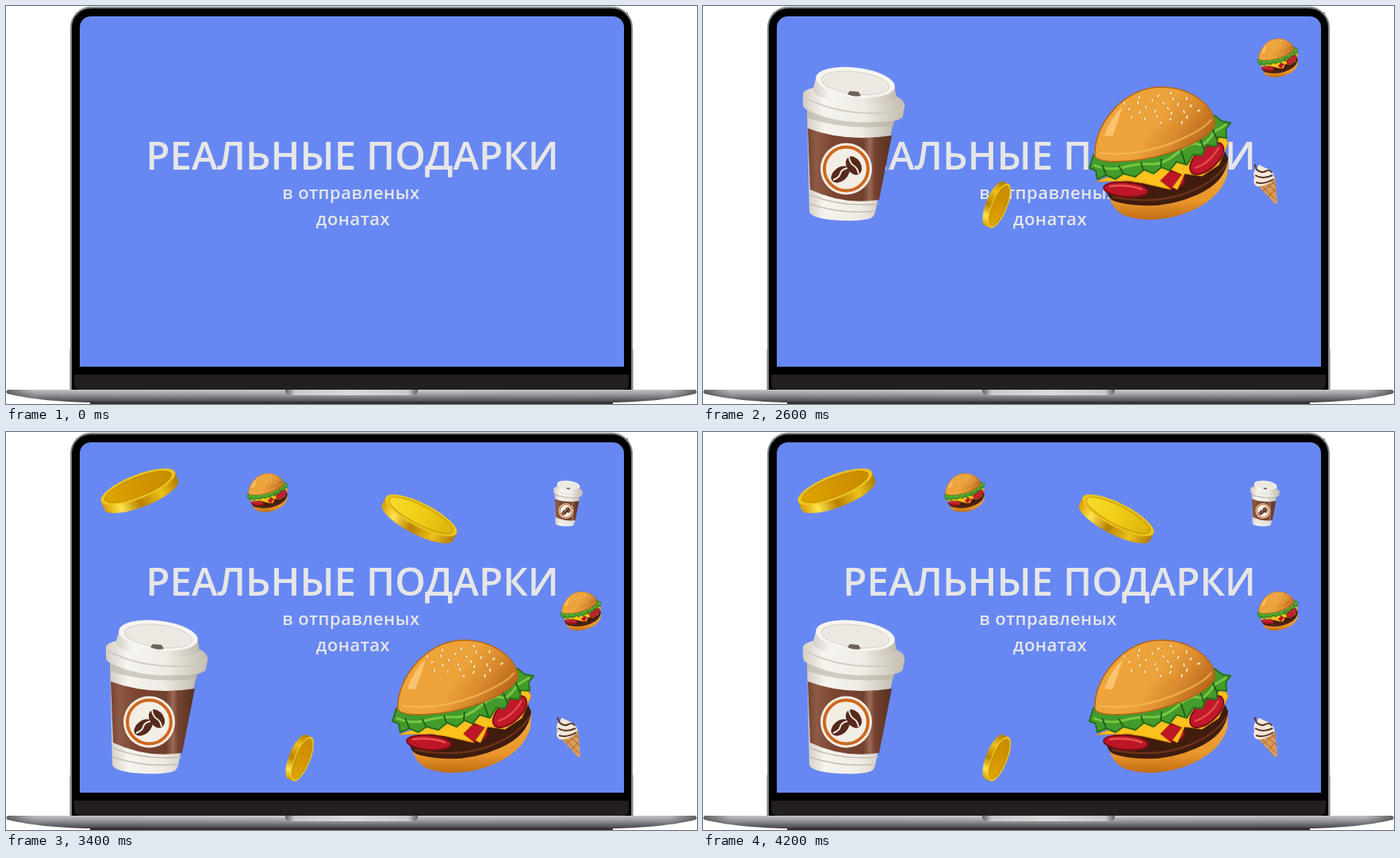
Animation of 871 by 501 pixels, one loop 6.2 s. Source, as an HTML page:

```html
<!DOCTYPE html>
<html lang="ru">
<head>
<meta charset="utf-8">
<style>
  html, body { margin: 0; width: 100%; height: 100%; overflow: hidden; background: #fff; }
  svg { display: block; width: 100%; height: 100%; }
  text { font-family: "Open Sans", "Noto Sans", sans-serif; font-weight: 600; text-anchor: middle; fill: #e6e6e6; }
  .title { font-size: 49.2px; }
  .sub { font-size: 22px; letter-spacing: .45px; }
</style>
</head>
<body>
<svg viewBox="0 0 871 501">
  <defs>
    <linearGradient id="paper">
      <stop offset="0" stop-color="#d3cdc3"/><stop offset=".2" stop-color="#f6f4ef"/>
      <stop offset=".6" stop-color="#efece5"/><stop offset="1" stop-color="#c2bbaf"/>
    </linearGradient>
    <linearGradient id="sleeve">
      <stop offset="0" stop-color="#744333"/><stop offset=".1" stop-color="#8d5a45"/>
      <stop offset=".3" stop-color="#7c4531"/><stop offset=".66" stop-color="#70402f"/>
      <stop offset=".74" stop-color="#9b6a55"/><stop offset=".8" stop-color="#764232"/>
      <stop offset="1" stop-color="#55301f"/>
    </linearGradient>
    <linearGradient id="bun" x1=".1" y1=".25" x2=".95" y2=".6">
      <stop offset="0" stop-color="#f0a53a"/><stop offset=".5" stop-color="#eda23a"/>
      <stop offset=".75" stop-color="#d98a2e"/><stop offset="1" stop-color="#b9681d"/>
    </linearGradient>
    <linearGradient id="heel" x2="0" y2="1">
      <stop offset="0" stop-color="#f6ad3c"/><stop offset=".7" stop-color="#e8952b"/>
      <stop offset="1" stop-color="#c06d14"/>
    </linearGradient>
    <linearGradient id="rim">
      <stop offset="0" stop-color="#d99a00"/><stop offset=".2" stop-color="#ffe44d"/>
      <stop offset=".45" stop-color="#b88000"/><stop offset=".75" stop-color="#edc21a"/>
      <stop offset="1" stop-color="#b07a00"/>
    </linearGradient>
    <linearGradient id="gold">
      <stop offset="0" stop-color="#dfa600"/><stop offset=".5" stop-color="#d39500"/><stop offset="1" stop-color="#c88b00"/>
    </linearGradient>
    <linearGradient id="brightGold">
      <stop offset="0" stop-color="#f7dc2a"/><stop offset=".5" stop-color="#efcd16"/><stop offset="1" stop-color="#dcb30c"/>
    </linearGradient>
    <linearGradient id="base" x2="0" y2="1">
      <stop offset="0" stop-color="#cfcfd3"/><stop offset=".3" stop-color="#aaa9af"/>
      <stop offset=".65" stop-color="#77767c"/><stop offset="1" stop-color="#3f3f43"/>
    </linearGradient>
    <linearGradient id="baseEnds">
      <stop offset="0" stop-color="#333" stop-opacity=".7"/><stop offset=".04" stop-color="#444" stop-opacity=".1"/>
      <stop offset=".5" stop-color="#444" stop-opacity="0"/>
      <stop offset=".96" stop-color="#444" stop-opacity=".1"/><stop offset="1" stop-color="#333" stop-opacity=".7"/>
    </linearGradient>
    <linearGradient id="notch">
      <stop offset="0" stop-color="#5e5e62"/><stop offset=".07" stop-color="#c9c9cc"/>
      <stop offset=".5" stop-color="#dadadd"/><stop offset=".93" stop-color="#c9c9cc"/><stop offset="1" stop-color="#5e5e62"/>
    </linearGradient>

    <g id="cup">
      <path d="M131 288L134 419Q136 426 160 429Q190 432 209 428Q216 426 217 419L242 296Z" fill="url(#paper)"/>
      <path d="M132 314Q180 332 238 323L222 404Q177 411 135 391Z" fill="url(#sleeve)"/>
      <path d="M135 398Q177 414 221 409M134 409Q176 423 218 418" fill="none" stroke="#c5beb2" stroke-width="1.5"/>
      <circle cx="180.500" cy="365" r="32.5" fill="#f3eee5"/>
      <circle cx="180.500" cy="365" r="27.5" fill="none" stroke="#cd681e" stroke-width="4"/>
      <g fill="#55291b">
        <ellipse cx="173" cy="372" rx="13" ry="8.5" transform="rotate(-38 173 372)"/>
        <ellipse cx="190" cy="361" rx="12.5" ry="9" transform="rotate(58 190 361)"/>
      </g>
      <path d="M164 379Q172 376 173 371T182 364M184 350Q185 358 190 361T196 371" fill="none" stroke="#f3eee5" stroke-width="2"/>
      <path d="M131 291Q180 314 242 303L240 311Q180 317 131 301Z" fill="#b9b2a5" opacity=".6"/>
      <path d="M126 272Q125 266 139 263L244 274Q255 278 254 287L252 299Q248 306 222 306Q165 305 130 290Q126 288 126 282Z" fill="url(#paper)"/>
      <path d="M126 274Q165 296 220 295Q248 295 254 285" fill="none" stroke="#cec8bd" stroke-width="1.5"/>
      <path d="M143 249L138 266Q144 278 186 283Q230 286 244 276L241 259Z" fill="url(#paper)"/>
      <ellipse cx="192" cy="256" rx="50" ry="18.5" transform="rotate(7 192 256)" fill="#f7f5f0"/>
      <ellipse cx="192" cy="257" rx="43" ry="14" transform="rotate(7 192 257)" fill="#ece9e2" stroke="#d5d0c7"/>
      <path d="M185 267L196 268L199 273Q190 275 182 271Z" fill="#6d6259"/>
    </g>

    <g id="burger">
      <path d="M511 394Q514 416 532 424Q565 435 605 422Q652 405 661 372L662 352Z" fill="url(#heel)"/>
      <path d="M509 391Q509 404 523 407Q575 419 622 398Q659 382 662 352L655 336L520 384Z" fill="#3f1c0e"/>
      <path d="M515 400Q575 412 620 391Q650 377 660 358" fill="none" stroke="#6b3219" stroke-width="2.5"/>
      <g fill="#bd1626" stroke="#7c0d17" stroke-width="2">
        <ellipse cx="533" cy="391" rx="28" ry="9" transform="rotate(5 533 391)"/>
        <ellipse cx="589" cy="379" rx="18" ry="11"/>
      </g>
      <path d="M512 387Q535 384 554 391" fill="none" stroke="#e95450" stroke-width="2.5"/>
      <path d="M496 381L520 372L602 350L654 320L662 332L650 360L629 374L607 371L598 391L592 388L604 372L590 366L576 380L590 391L555 383L536 380Z" fill="#fbc11c" stroke="#d9920d"/>
      <ellipse cx="635" cy="352" rx="26" ry="13" transform="rotate(-42 635 352)" fill="#c1182a" stroke="#7c0d17" stroke-width="2"/>
      <path d="M620 364Q640 357 650 338" fill="none" stroke="#e64b4d" stroke-width="2.5"/>
      <path d="M492 348L487 364L495 367L497 378L508 373L520 378L530 371L545 375L556 366L568 371L578 363L588 367L597 356L610 360L618 347L629 348L635 335L647 337L649 325L660 326L659 315L665 307L654 305L645 298L636 300L600 330Z" fill="#439b2b" stroke="#286f1b" stroke-width="2" stroke-linejoin="round"/>
      <path d="M492 360Q510 368 530 363T565 359T598 345T624 334T645 318L660 309" fill="none" stroke="#78c843" stroke-width="3"/>
      <path d="M503 360L508 372M524 361L530 371M552 357L555 366M578 352L577 363M602 341L608 358M626 326L632 341M641 312L648 328" stroke="#205f17" stroke-width="2"/>
      <path d="M494 349C492 310 530 262 577 262C616 262 646 287 645 309C641 325 600 344 560 352C530 357 499 358 494 349Z" fill="url(#bun)" stroke="#b56314" stroke-width="1.5"/>
      <path d="M499 345Q545 350 590 333Q630 317 641 303" fill="none" stroke="#f7bb55" stroke-width="2.5" opacity=".7"/>
      <path d="M506 323Q514 300 529 286Q523 306 516 324Z" fill="#ffda94" opacity=".6"/>
      <g id="seeds" fill="#ffe5ac" stroke="#bd7424" stroke-width=".5"></g>
    </g>

    <g id="cone">
      <path d="M698 384L721 375L724 407Q723 411 720 408Z" fill="#d99a59"/>
      <path d="M701 383L722 404M708 380L723 395M714 378L722 386M705 393L721 381M712 401L722 390" stroke="#a0612f" stroke-width="1"/>
      <path d="M699 363Q700 358 703 361L716 367Q722 374 719 379Q709 388 698 387Q692 383 695 376Q692 367 699 363Z" fill="#f3e8da"/>
      <path d="M695 359L698 366Q703 371 709 368T717 370M696 373Q705 379 718 373M697 382Q708 385 719 378" fill="none" stroke="#573624" stroke-width="2"/>
    </g>
  </defs>

  <rect x="88" y="8" width="696" height="450" fill="#6788f2"/>
  <text class="title" x="436.5" y="206">РЕАЛЬНЫЕ ПОДАРКИ</text>
  <text class="sub" x="435" y="243">в отправленых</text>
  <text class="sub" x="437.5" y="276">донатах</text>

  <g id="gifts">
    <g id="coins"></g>
    <use href="#burger" transform="translate(160.9 -24.8) scale(.293)"/>
    <use href="#burger" transform="translate(555.9 124.2) scale(.293)"/>
    <use href="#cup" transform="translate(654.4 -9.1) scale(.285 .297)"/>
    <use href="#cone"/>
    <use href="#cup"/>
    <use href="#burger"/>
  </g>

  <g id="laptop">
    <path fill-rule="evenodd" fill="#808a88" d="M81 484V27A26 26 0 0 1 107 .8H764A26 26 0 0 1 790 27V484ZM93 454V27A14 14 0 0 1 107 13H765A14 14 0 0 1 779 27V454Z"/>
    <path fill-rule="evenodd" d="M83 484V27A24 24 0 0 1 107 3H764A24 24 0 0 1 788 27V484ZM93 454V27A14 14 0 0 1 107 13H765A14 14 0 0 1 779 27V454Z"/>
    <path d="M86 464H785V475Q785 483 777 483H94Q86 483 86 475Z" fill="#231f20"/>
    <path d="M80.500 432V483M790.500 432V483" stroke="#77807e" opacity=".5"/>
    <g id="deck">
      <path d="M2 483H869Q872 486 869 488C842 495 795 499 764 499H106C76 499 29 495 2 488Q-1 486 2 483Z" fill="url(#base)"/>
      <path d="M2 483H869Q872 486 869 488C842 495 795 499 764 499H106C76 499 29 495 2 488Q-1 486 2 483Z" fill="url(#baseEnds)"/>
      <path d="M106 498.500H765V501H106Z" fill="#303033"/>
      <path d="M352 483H519V485Q518 490 511 490H360Q353 490 352 485Z" fill="url(#notch)"/>
    </g>
  </g>
</svg>
<script>
  const DURATION = 6200;
  const SEEDS = 26;
  const byId = id => document.getElementById(id);

  // Seeds follow a golden-angle spiral across the dome.
  byId('seeds').innerHTML = Array.from({ length: SEEDS }, (_, i) => {
    const r = Math.sqrt((i + .5) / SEEDS), a = i * 2.4;
    const x = 579 + 51 * r * Math.cos(a), y = 289 + 21 * r * Math.sin(a);
    return `<ellipse cx="${x}" cy="${y}" rx="1.5" ry="2.7" transform="rotate(${(i * 47) % 90 - 30} ${x} ${y})"/>`;
  }).join('');

  function coin({ x, y, rx, ry, angle, depth, fill }) {
    const top = Math.min(0, depth), bottom = Math.max(0, depth);
    const arc = `A${rx} ${ry} 0 0 1`;
    return `<g transform="translate(${x} ${y}) rotate(${angle})">
      <path d="M${-rx} ${top}${arc} ${rx} ${top}V${bottom}${arc} ${-rx} ${bottom}Z" fill="url(#rim)"/>
      <ellipse rx="${rx}" ry="${ry}" fill="#f0c61c"/>
      <ellipse rx="${rx * .9}" ry="${ry * .8}" fill="url(#${fill})" stroke="#a97a00" stroke-width=".8"/>
    </g>`;
  }

  byId('coins').innerHTML = [
    { x: 166.5, y: 69, rx: 50, ry: 15, angle: -21.5, depth: 11, fill: 'gold' },
    { x: 523.3, y: 105, rx: 50, ry: 15, angle: 27, depth: 10, fill: 'brightGold' },
    { x: 373.4, y: 411.5, rx: 30, ry: 10, angle: -68, depth: -7, fill: 'gold' }
  ].map(coin).join('');

  // [time, vertical offset]: the fall, then three shrinking bounces.
  const steps = [
    [0, -600], [2000, -400], [2200, -320], [2400, -240], [2600, -160], [2800, -80],
    [3000, 0], [3200, 11], [3400, 0], [3600, 6], [3800, 0], [4000, 3], [4200, 0], [DURATION, 0]
  ];
  byId('gifts').animate(
    steps.map(([time, y]) => ({ offset: time / DURATION, transform: `translateY(${y}px)`, easing: 'steps(1, end)' })),
    { duration: DURATION, iterations: Infinity }
  );
</script>
</body>
</html>
```
